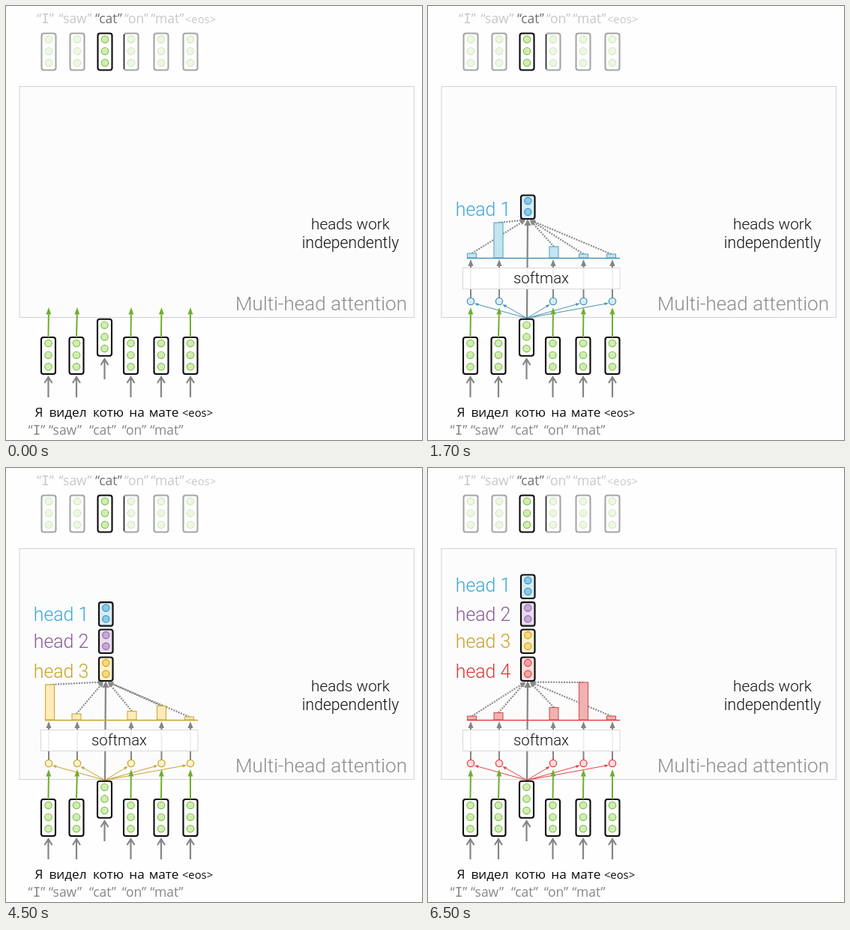
These frames come from a looping animation (555x579 px, 8 s). An HTML page:

```html
<!DOCTYPE html>
<html lang="en">
<head>
<meta charset="utf-8">
<title>Multi-head attention</title>
<style>
html, body { margin: 0; width: 100%; height: 100%; overflow: hidden; background: #fefefe; }
svg { display: block; width: 555px; height: 579px; }
text { font-family: Roboto, "Open Sans", sans-serif; font-weight: 300; text-anchor: middle; }
.word { font-family: "Open Sans", "Noto Sans", sans-serif; font-weight: 500; }
.serif { font-family: "DejaVu Sans Mono", monospace; }
.scene { visibility: hidden; animation: 8s step-end infinite; }
.scene:nth-child(1) { animation-name: one; }
.scene:nth-child(2) { animation-name: two; }
.scene:nth-child(3) { animation-name: three; }
.scene:nth-child(4) { animation-name: four; }
@keyframes one   { 0% { visibility: hidden } 6.25%  { visibility: visible } 31.25%, 100% { visibility: hidden } }
@keyframes two   { 0% { visibility: hidden } 31.25% { visibility: visible } 56.25%, 100% { visibility: hidden } }
@keyframes three { 0% { visibility: hidden } 56.25% { visibility: visible } 81.25%, 100% { visibility: hidden } }
@keyframes four  { 0% { visibility: hidden } 81.25%, 100% { visibility: visible } }
</style>
</head>
<body>
<svg id="stage" viewBox="0 0 555 579"></svg>
<script>
const GREEN = { fill: '#d0eeb2', line: '#86c052' };
const HEADS = [
  { text: '#3ba7dc', line: '#4a93b5', edge: '#5aa7c6', fill: '#c3e4f0', dot: '#86cbec', box: '#d8ecf6', tops: [330, 289, 321, 331, 331] },
  { text: '#8a5a9e', line: '#9a68b2', edge: '#9a70ac', fill: '#dac5e3', dot: '#c8a8d6', box: '#e8deed', tops: [325, 323, 289, 321.5, 327] },
  { text: '#c9a227', line: '#c8a232', edge: '#cfa93a', fill: '#fdebb8', dot: '#fbdb78', box: '#fdf1cd', tops: [289, 328, 324.5, 317.5, 332] },
  { text: '#d63a3a', line: '#e04444', edge: '#cc5555', fill: '#f0b2b2', dot: '#f6a4a4', box: '#fadcdc', tops: [331, 326.5, 319.5, 286, 331] }
];
const LANES = [57, 95, 167, 207.5, 246];
const BARS = [58.5, 94, 168, 207.5, 244.5];
const INPUTS = [56.5, 94, 166.5, 207, 246];
const BOX_Y = [252, 215, 178.7, 142];
const LABEL_Y = [280, 240, 203.5, 165];

const line = (x1, y1, x2, y2, color, w, extra = '') =>
  `<path d="M${x1} ${y1}L${x2} ${y2}" fill="none" stroke="${color}" stroke-width="${w}" ${extra}/>`;
const rect = (x, y, w, h, fill, stroke, sw, rx = 0) =>
  `<rect x="${x}" y="${y}" width="${w}" height="${h}" rx="${rx}" fill="${fill}" stroke="${stroke}" stroke-width="${sw}"/>`;
const dot = (x, y, r, fill, stroke, w = 1.2) =>
  `<circle cx="${x}" cy="${y}" r="${r}" fill="${fill}" stroke="${stroke}" stroke-width="${w}"/>`;
const label = (x, y, size, color, s, extra = '') =>
  `<text x="${x}" y="${y}" font-size="${size}" fill="${color}" ${extra}>${s}</text>`;

function arrow(x1, y1, x2, y2, color, w, len, half, extra) {
  const a = Math.atan2(y2 - y1, x2 - x1), c = Math.cos(a), s = Math.sin(a);
  const bx = x2 - len * c, by = y2 - len * s;
  return line(x1, y1, bx, by, color, w, extra) +
    `<path d="M${x2} ${y2}L${bx - half * s} ${by + half * c}L${bx + half * s} ${by - half * c}Z" fill="${color}"/>`;
}

function openArrow(x, bottom, top) {
  return `<path d="M${x} ${bottom}V${top}M${x - 5} ${top + 8}L${x} ${top}L${x + 5} ${top + 8}" fill="none" stroke="#858585" stroke-width="2.2"/>`;
}

function token(x, y) {
  return rect(x - 9.5, y, 19, 49, '#fff', '#0a0a0a', 2.1, 3) +
    [8, 23.7, 39.3].map(d => dot(x, y + d, 4.7, GREEN.fill, GREEN.line)).join('');
}

function words(list, y, color, size) {
  return list.map(([s, x, own]) => {
    const t = s.replace('I', '<tspan class="serif">I</tspan>').replace('<eos>', '&lt;eos&gt;');
    return label(x, y, s === '<eos>' ? 14.8 : size, own || color, t, 'class="word"');
  }).join('');
}

function scene(n) {
  const h = HEADS[n];
  let s = arrow(132, 416, 133, 284, '#858585', 2.2, 9, 4.5);
  LANES.forEach(x => s += arrow(x, 389, x, 338, '#858585', 2, 9, 3.6));
  s += rect(46.5, 349.5, 209.5, 28, 'rgba(255,255,255,.88)', '#d8d8d8', 1);
  s += label(151, 370, 20.4, '#151515', 'softmax');

  BARS.forEach((x, i) => s += arrow(x, h.tops[i], 133 + Math.sign(x - 133) * 3, 285.5,
    '#8a8a8a', 2.2, 7, 3.2, 'stroke-dasharray="2 1.5"'));
  LANES.forEach((x, i) => {
    const k = 1 - 5 / Math.hypot(x - 132, 21);
    s += arrow(132, 416.5, 132 + (x - 132) * k, 416.5 - 21 * k, h.line, 1, 5.5, 2);
    s += dot(x, 394, 4.6, h.box, h.line, 1.3);
    s += rect(BARS[i] - 6, h.tops[i], 12, 336 - h.tops[i], h.fill, h.edge, 1.1);
  });
  s += line(52, 336.5, 256, 336.5, h.line, 1.7);

  for (let i = 0; i <= n; i++) {
    const p = HEADS[i], y = BOX_Y[n - i];
    s += rect(124, y + .5, 18.5, 31.5, p.box, '#111', 2.2, 3);
    s += dot(133.3, y + 8, 4.6, p.dot, p.line) + dot(133.3, y + 22.7, 4.6, p.dot, p.line);
    s += label(73.5, LABEL_Y[n - i], 24.9, p.text, 'head ' + (i + 1));
  }
  return `<g class="scene">${s}</g>`;
}

let art = rect(18, 107.5, 526.5, 308, '#fbfcfb', '#d2d2d2', 1);
art += label(459.5, 298.2, 20.8, '#111', 'heads work') + label(459.5, 322.5, 21.2, '#111', 'independently');
art += label(420.5, 405.5, 26.1, '#8c8c8c', 'Multi-head attention');

art += `<g opacity=".36">${[57, 95, 167, 207, 246].map(x => token(x, 36.5)).join('')}</g>`;
art += token(132, 36.5) + line(157.5, 38, 157.5, 84, '#222', 1.3);
art += words([['“I”', 52.5], ['“saw”', 92.5], ['“cat”', 137, '#707070'], ['“on”', 174], ['“mat”', 215.5], ['<eos>', 259.5]], 23, '#c8c8c8', 17.5);

art += `<g>${HEADS.map((h, n) => scene(n)).join('')}</g>`;

INPUTS.forEach((x, i) => {
  art += token(x, 442) + openArrow(x, 522, 495);
  art += arrow(x, 442, LANES[i], 402, '#6fae2e', 2, 9.5, 3.4);
});
art += token(131.5, 417.7) + openArrow(131.5, 498, 471);

art += words([['Я', 44], ['видел', 82.5], ['котю', 136.5], ['на', 174.5], ['мате', 210.5], ['<eos>', 255.5]], 547.5, '#0a0a0a', 17.2);
art += words([['“I”', 41], ['“saw”', 79], ['“cat”', 129], ['“on”', 171], ['“mat”', 214.5]], 572, '#888', 17.5);

document.getElementById('stage').innerHTML = art;
</script>
</body>
</html>
```
